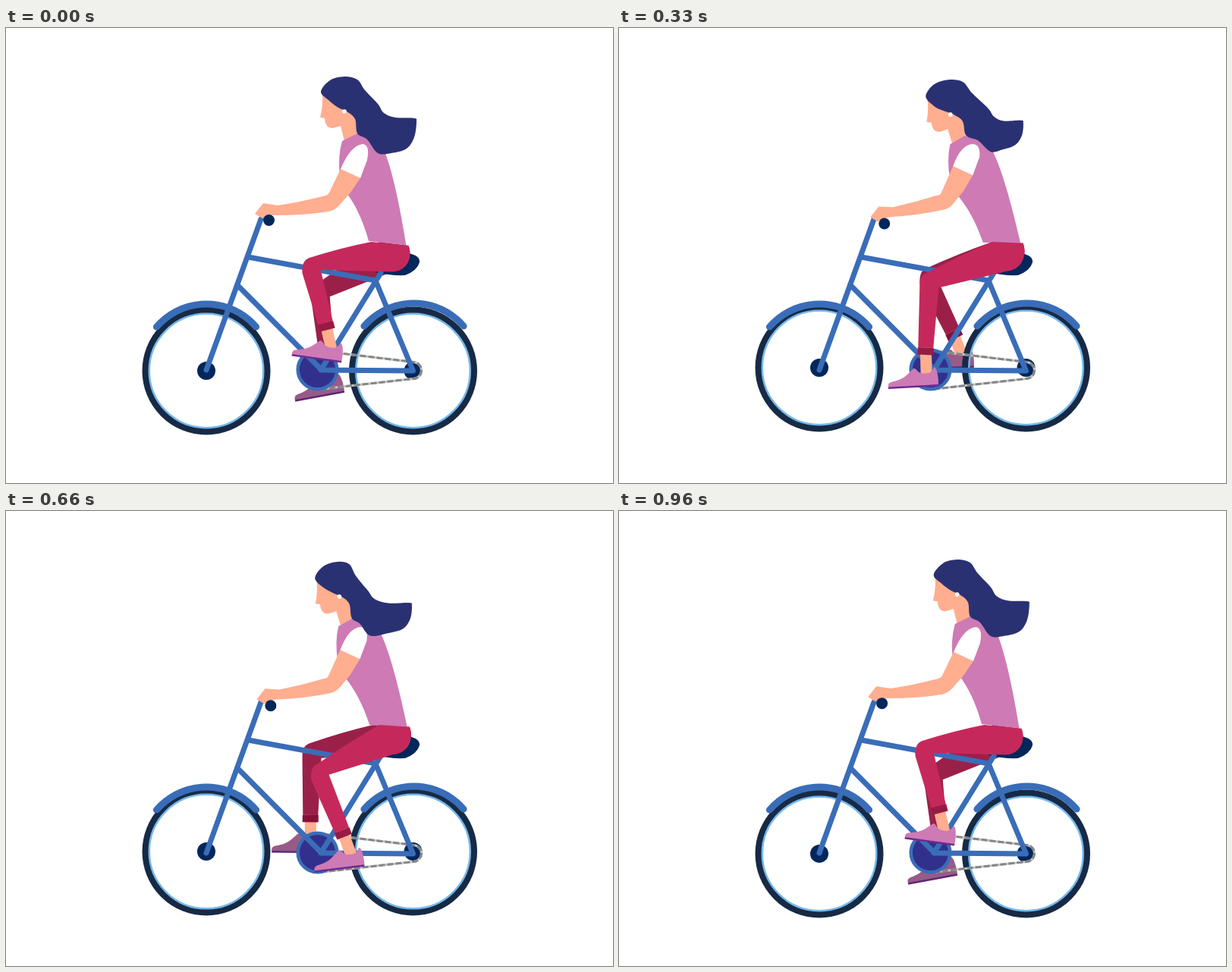
Animation, 800 px wide and 600 px high, one loop 0.99 s. Source, as an HTML page with a canvas:

```html
<!DOCTYPE html>
<html lang="en">
<head>
<meta charset="utf-8">
<title>Cyclist</title>
<style>
  html, body { margin: 0; width: 100%; height: 100%; overflow: hidden; background: #fff; }
  canvas { display: block; width: 800px; height: 600px; }
</style>
</head>
<body>
<canvas id="stage" width="800" height="600"></canvas>
<script>
const ctx = document.getElementById('stage').getContext('2d');
const { PI, sin, cos } = Math;
const TAU = PI * 2;
const BLUE = '#3a6db8', NAVY = '#03275a', TYRE = '#172a45', RIM = '#75b9ee';
const SKIN = '#ffae8f', PINK = '#ce7ab5', HAIR = '#2a3172';
const FRONT = { pants: '#c5295b', cuff: '#971b44', shoe: PINK, sole: '#6f2a91' };
const BACK = { pants: '#9b2049', cuff: '#851139', shoe: '#985b88', sole: '#5f2575' };

const SHOE = new Path2D('M-33-2Q-34-8-28-9Q-15-11-8-17Q-2-22 1-25Q4-26 7-21Q10-18 16-18Q25-17 28-25Q30-27 32-20Q34-10 33-2Z');
const FACE = new Path2D('M417 86Q418 103 414 118L420 119Q421 132 430 132Q436 131 441 129L446 149L464 140V110L440 85Z');
const TORSO = new Path2D('M443 149L463 139Q490 145 499 163C510 190 520 240 527.5 286.5L478 281C470 252 460 233 450 219L440 195Q437 170 443 149Z');
const SEAT = new Path2D('M486 322C500 321 510 297 530 297Q546 300 545 309Q542 320 526 326Q508 327 486 322Z');

function fill(color, path) {
  ctx.fillStyle = color;
  path ? ctx.fill(path) : ctx.fill();
}

function stroke(color, width) {
  ctx.strokeStyle = color;
  ctx.lineWidth = width;
  ctx.stroke();
}

function disc(color, x, y, r) {
  ctx.beginPath();
  ctx.arc(x, y, r, 0, TAU);
  fill(color);
}

function arc(color, width, x, y, r, from = 0, to = TAU) {
  ctx.beginPath();
  ctx.arc(x, y, r, from, to);
  stroke(color, width);
}

function line(color, width, ...p) {
  ctx.beginPath();
  for (let i = 0; i < p.length; i += 2) ctx.lineTo(p[i], p[i + 1]);
  stroke(color, width);
}

// Closed smooth curve through the points
function blob(color, pts) {
  const n = pts.length, at = i => pts[(i + n) % n];
  ctx.beginPath();
  ctx.moveTo(...pts[0]);
  for (let i = 0; i < n; i++) {
    const [a, b, c, d] = [at(i - 1), at(i), at(i + 1), at(i + 2)];
    ctx.bezierCurveTo(b[0] + (c[0] - a[0]) / 6, b[1] + (c[1] - a[1]) / 6,
      c[0] - (d[0] - b[0]) / 6, c[1] - (d[1] - b[1]) / 6, c[0], c[1]);
  }
  fill(color);
}

function placed(x, y, angle, draw) {
  ctx.save();
  ctx.translate(x, y);
  ctx.rotate(angle);
  draw();
  ctx.restore();
}

function leg(phase, lean, look) {
  const cycle = (mean, size, lag) => mean - size * cos(TAU * (phase - lag));
  const kneeX = cycle(408, 6.8, .086), kneeY = cycle(333, 18.3, .068);
  const cuffX = cycle(422, 22, .243), cuffY = cycle(410.8, 21.9, .013);
  const soleX = cycle(411.5, 29.8, .238), soleY = cycle(461.8, 24.9, .01);
  const tilt = (cycle(-2.4, -7.9, .054) + 1.1 * cos(2 * TAU * phase) + 1.7 * cos(3 * TAU * phase)) * PI / 180;

  // Ankle and shoe
  ctx.lineCap = 'butt';
  line(SKIN, 15, cuffX, cuffY,
    soleX + 18 * cos(tilt) + 15 * sin(tilt), soleY + 18 * sin(tilt) - 15 * cos(tilt));
  placed(soleX, soleY, tilt, () => {
    fill(look.shoe, SHOE);
    ctx.fillStyle = look.sole;
    ctx.fillRect(-33, -2.5, 66, 2.5);
  });

  // Trousers: (ax, ay) points across the calf
  const calf = Math.atan2(kneeX - cuffX, cuffY - kneeY);
  const ax = cos(calf), ay = sin(calf);
  const hip = Math.min(492, 481 + .8 * (kneeY - 316));
  const rx = 2.5 * lean, ry = -4 * lean;
  ctx.beginPath();
  ctx.moveTo(hip, 282);
  ctx.quadraticCurveTo((hip + kneeX) / 2, (kneeY + 269) / 2 - 3, kneeX - 3, kneeY - 13);
  ctx.quadraticCurveTo(kneeX - 13, kneeY - 9, kneeX - 12 * ax, kneeY - 12 * ay + 4);
  ctx.lineTo(cuffX - 10 * ax, cuffY - 10 * ay);
  ctx.lineTo(cuffX + 10 * ax, cuffY + 10 * ay);
  ctx.lineTo(kneeX + 13 * ax, kneeY + 13 * ay + 6);
  ctx.lineTo(509 + rx, 321.5 + ry / 4);
  ctx.bezierCurveTo(527 + rx, 321 + ry / 2, 537 + rx, 305 + ry, 530.5 + rx, 287 + ry);
  fill(look.pants);
  placed(cuffX, cuffY, calf, () => {
    ctx.fillStyle = look.cuff;
    ctx.fillRect(-10.5, 0, 21, 9.5);
  });
}

function wheel(x, y) {
  arc(RIM, 3, x, y, 75.5);
  arc(TYRE, 8, x, y, 80.5);
  disc(NAVY, x, y, 12);
}

function chain() {
  ctx.beginPath();
  ctx.moveTo(412, 425.5);
  ctx.lineTo(537, 440.5);
  ctx.arc(536.5, 451.5, 11, -PI / 2, PI / 2);
  ctx.lineTo(412, 476.5);
  stroke('#c4c4c4', 3);
  ctx.setLineDash([8, 3]);
  stroke('#868686', 3);
  ctx.setLineDash([]);
}

function bike(lean) {
  const axle = 452 - 5 * lean;
  wheel(264, axle);
  wheel(536.5, axle);
  ctx.lineCap = 'butt';
  chain();
  disc('#32308d', 410.5, 450.5, 25);
  arc(BLUE, 4.5, 410.5, 450.5, 25.8);
  fill(NAVY, SEAT);
  ctx.lineCap = ctx.lineJoin = 'round';
  arc(BLUE, 9, 264, 450.5, 86.5, PI + .71, TAU - .71);
  arc(BLUE, 9, 537.5, 449.5, 86.5, PI + .71, TAU - .71);
  line(BLUE, 7, 336, 252, 264, 451);
  line(BLUE, 7, 319, 302, 487, 333);
  line(BLUE, 7, 305, 339, 415, 450);
  line(BLUE, 7, 494, 323, 415, 451, 536.5, 452, 487, 333);
}

// Both paths stretch between the moving shoulder and the hand (dx, dy)
function arm(lean) {
  const dx = 4 * lean, dy = 5.5 * lean, up = -4.5 * lean;
  fill(SKIN, new Path2D(`M${441 - lean} ${186 + up}L${426 - lean} ${217 - lean}
    Q424 221 417 ${222 - lean}Q390 ${229 + lean} ${358 + dx} ${234 + dy / 2}
    L${339 + dx} ${231 + dy}L${328 + dx} ${245 + dy}L${338 + dx} ${251 + dy}
    Q${343 + dx} ${247 + dy} ${354 + dx} ${247 + dy / 2}Q395 247 ${425 + dx} ${242 - lean * 3}
    Q${434 + dx / 2} ${240 - lean * 3} 440 ${233 - lean}L454 ${217 - lean * 2}L${467 - lean} ${198 + up}Z`));
  fill('#fff', new Path2D(`M${441 - lean} ${186 + up}Q${454 - dx} ${155 + up / 2} ${470 - dx} 153
    Q${480 - dx} 154 ${476 - lean} ${174 + up}L${467 - lean} ${198 + up}Z`));
  disc(NAVY, 346.5 + dx, 253.5 + dy, 7.5);
}

// The middle of the hair waves sideways; its loose end flattens with the lean
function hair(lean, sway) {
  const flow = ([x, y]) => {
    const loose = Math.min(1, Math.max(0, (x - 465) / 45));
    return [
      x + 7 * sway * Math.exp(-(((x - 490) / 25) ** 2)),
      y + .25 * lean * loose * (142 - y)
    ];
  };
  blob(HAIR, [
    [415, 84], [427, 69], [446, 64], [463, 68], [473, 82], [490, 100], [498, 112],
    [513, 118], [538, 119], [541, 124], [538, 144], [528, 159], [508, 165], [490, 165],
    [476, 147], [463, 139], [460, 120], [449, 110], [438, 105], [425, 95 + 3 * lean]
  ].map(flow));
}

function rider(lean, sway) {
  const leaning = draw => placed(505, 255, -.078 * lean, () => {
    ctx.translate(-505, -255);
    draw();
  });
  leaning(() => {
    fill(SKIN, FACE);
    fill(PINK, TORSO);
  });
  arm(lean);
  leaning(() => {
    hair(lean, sway);
    disc('#fff', 446, 110, 2.8);
  });
}

function draw(now) {
  const step = Math.floor(now % 990 / 30), turn = step / 32;
  const lean = (1 - cos(TAU * step / 30.5)) / 2;
  ctx.fillStyle = '#fff';
  ctx.fillRect(0, 0, 800, 600);
  leg(turn + .5, lean, BACK);
  bike(lean);
  rider(lean, sin(TAU * turn));
  leg(turn, lean, FRONT);
}

let start;
function tick(now) {
  start ??= now;
  draw(Math.max(0, now - start));
  requestAnimationFrame(tick);
}
requestAnimationFrame(tick);
</script>
</body>
</html>
```
